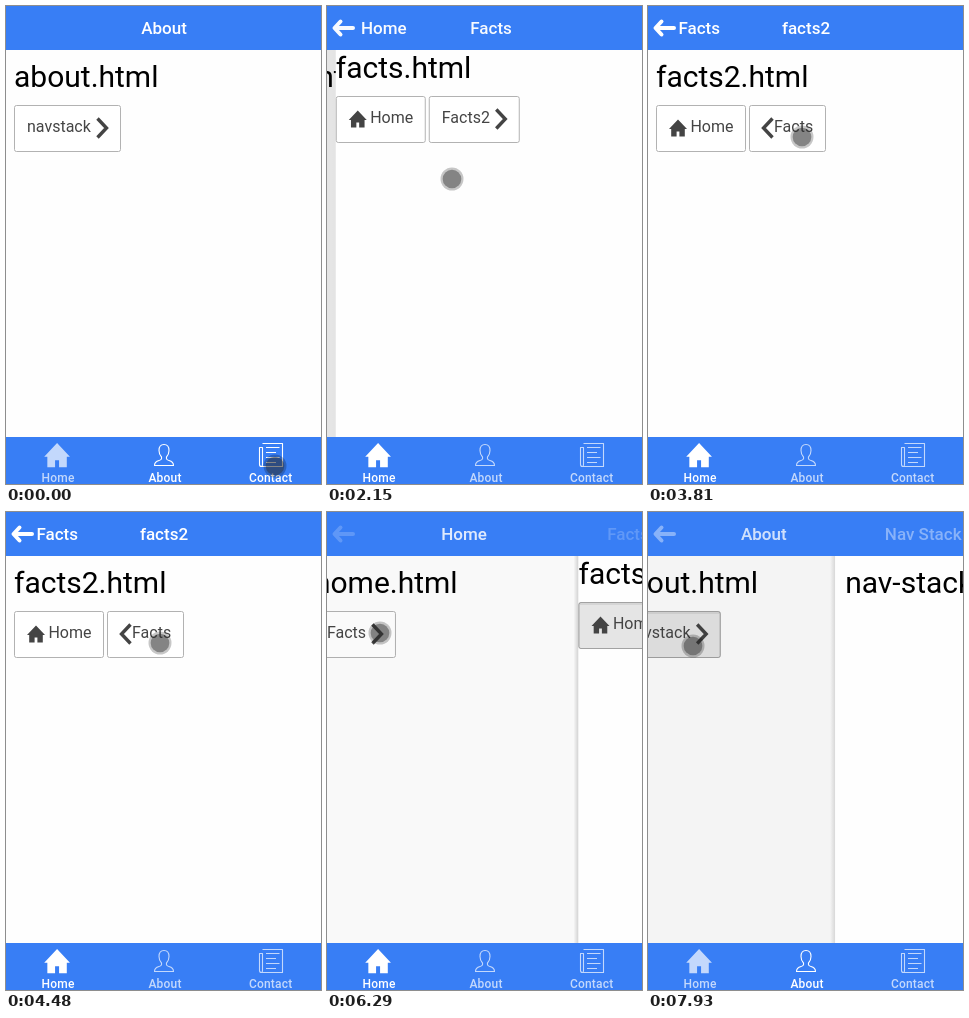
An HTML page for the animation above (8 s loop, 315 by 478 pixels).

```html
<!DOCTYPE html>
<html lang="en">
<head>
<meta charset="utf-8">
<title>Tabs and navigation</title>
<style>
html, body { margin: 0; width: 100%; height: 100%; overflow: hidden; background: #fff; }
svg { display: block; width: 315px; height: 478px; }
text { font-family: Roboto, Arial, sans-serif; white-space: pre; }
.bar { font-size: 17px; font-weight: 500; fill: #fff; }
.tab { font-size: 12px; font-weight: 500; letter-spacing: .2px; fill: #fff; text-anchor: middle; }
.h1 { font-size: 30px; fill: #000; }
.label { font-size: 16px; fill: #444; }
.line { fill: none; stroke: #fff; stroke-width: 1.1; stroke-linejoin: round; }
</style>
</head>
<body>
<svg id="stage" viewBox="0 0 315 478">
  <defs>
    <linearGradient id="edge">
      <stop offset="0" stop-color="#000" stop-opacity="0"/>
      <stop offset="1" stop-color="#000" stop-opacity=".2"/>
    </linearGradient>
    <path id="house" d="M0 9.6 9 0l9 9.6h-2.2V17h-5.400v-5H7.600v5H2.200V9.600z"/>
  </defs>
  <rect width="315" height="478" fill="#fff"/>
  <g id="pages"></g>
  <rect width="315" height="44" fill="#387ef5"/>
  <g id="heads"></g>
  <path id="arrow" d="M13.500 15.500 7.500 22l6 6.500M8.500 22H26" fill="none" stroke="#fff"
    stroke-width="4" stroke-linecap="round" stroke-linejoin="round"/>
  <rect y="431" width="315" height="47" fill="#387ef5"/>
  <g id="tabs">
    <g>
      <use href="#house" transform="translate(38.200 437) scale(1.430)" fill="#fff"/>
      <text class="tab" x="52" y="476">Home</text>
    </g>
    <g>
      <path class="line" d="M158 438.500c-3.500 0-5 2.500-5 6 0 3 1 5 2.500 6.500.5 2-.5 3-2.500 3.500-3 .8-4.500 2-4.500 5h19c0-3-1.500-4.200-4.500-5-2-.5-3-1.500-2.500-3.500 1.500-1.500 2.500-3.500 2.500-6.500 0-3.500-1.500-6-5-6z"/>
      <text class="tab" x="159" y="476">About</text>
    </g>
    <g>
      <path class="line" d="M256.500 437.500h20v23h-21q-2 0-2-2v-17h3v17q0 2-1 2M260 441.500h13.500M260 446.500h10M260 451.500h13.500M260 456.500h10"/>
      <text class="tab" x="264.700" y="476">Contact</text>
    </g>
  </g>
  <g id="cursor">
    <circle r="11.500" fill="#000" fill-opacity=".22"/>
    <circle r="9.300" fill="#333" fill-opacity=".45"/>
  </g>
</svg>
<script>
const LOOP = 8000, SLIDE = 500, PRESS = 130, TAB_LEAD = 160;
const WIDTH = 317, INSET = -2, PARALLAX = 105, CENTER = 158, BACK_X = 30.4;

const $ = id => document.getElementById(id);
const set = (el, attrs) => { for (const k in attrs) el.setAttribute(k, attrs[k]); };
const clamp = x => Math.min(1, Math.max(0, x));
const pen = document.createElement('canvas').getContext('2d');
const measure = (text, font) => {
  pen.font = font + ' Roboto, Arial, sans-serif';
  return pen.measureText(text).width;
};
const titleLeft = text => CENTER - measure(text, '500 17px') / 2;

// Each button is [label, icon]; a tight page has no padding.
const screens = {
  home: { tab: 0, title: 'Home', h1: 'home.html', buttons: [['Facts', 'next']] },
  about: { tab: 1, title: 'About', h1: 'about.html', buttons: [['navstack', 'next']] },
  contact: { tab: 2, title: 'Contact', h1: 'contact.html', buttons: [] },
  facts: { tab: 0, title: 'Facts', back: 'Home', h1: 'facts.html', tight: true,
    buttons: [['Home', 'house'], ['Facts2', 'next']] },
  facts2: { tab: 0, title: 'facts2', back: 'Facts', h1: 'facts2.html',
    buttons: [['Home', 'house'], ['Facts', 'prev']] },
  stack: { tab: 1, title: 'Nav Stack', back: 'About', h1: 'nav-stack.html', buttons: [] }
};

// dir: 1 slides forward, -1 slides back, 0 cuts; button is the one tapped to leave.
const visits = [
  { at: 0, name: 'about', dir: 0 },
  { at: 120, name: 'contact', dir: 0 },
  { at: 900, name: 'home', dir: 0 },
  { at: 1825, name: 'facts', dir: 1, button: 0 },
  { at: 2860, name: 'facts2', dir: 1, button: 1 },
  { at: 4560, name: 'facts', dir: -1, button: 1 },
  { at: 6137, name: 'home', dir: -1, button: 0 },
  { at: 7140, name: 'about', dir: 0 },
  { at: 7848, name: 'stack', dir: 1, button: 0 }
];

// Pointer moves: [leave, arrive, x, y]
const START = [269, 460];
const hops = [
  [380, 740, 55, 459], [1250, 1600, 52, 130], [1900, 2120, 125, 173], [2120, 2510, 158, 130],
  [3700, 3810, 154, 131], [4700, 5500, 53, 121], [6300, 6700, 158, 453], [7300, 7660, 45, 134]
];

// The screen refreshes in evenly spaced bursts: [first, last, count]
const bursts = [
  [0, 120, 2], [430, 1370, 7], [1490, 2510, 9], [2630, 3350, 6], [3810, 3930, 2],
  [4240, 5170, 8], [5320, 5620, 3], [6020, 6710, 6], [6990, 7140, 2], [7420, 7930, 5]
];

function lastRefresh(t) {
  const [first, last, count] = bursts.filter(b => b[0] <= t).pop();
  const gap = (last - first) / (count - 1);
  const step = Math.min(count - 1, Math.floor((t - first + 9) / gap));
  return Math.floor((first + step * gap) / 10) * 10;
}

function chevron(x, y, dir) {
  const tip = x + 6 + 4.5 * dir, tail = x + 6 - 4.5 * dir;
  return `<path d="M${tail} ${y + 13.5}L${tip} ${y + 23}L${tail} ${y + 32.5}"
    fill="none" stroke="#444" stroke-width="3.4"/>`;
}

function button(x, y, label, icon) {
  const tw = Math.round(measure(label, '16px'));
  const lead = { house: 21.4, prev: 12, next: 0 }[icon];
  const w = Math.round(26 + tw + lead + (icon === 'next' ? 17 : 0));
  const box = `x="${x + .5}" y="${y + .5}" width="${w - 1}" height="46" rx="2"`;
  const art = {
    house: `<use href="#house" x="${x + 13}" y="${y + 14.5}" fill="#444"/>`,
    prev: chevron(x + 13, y, -1),
    next: chevron(x + 18 + tw, y, 1)
  }[icon];
  const svg = `<rect ${box} fill="#fff" stroke="#b2b2b2"/>
    <g class="press"><rect ${box} fill="#e5e5e5" stroke="#a2a2a2"/>
    <path d="M${x + 1} ${y + 2}h${w - 2}" stroke="#000" stroke-opacity=".07" stroke-width="2"/></g>
    ${art}<text class="label" x="${x + 13 + lead}" y="${y + 27}">${label}</text>`;
  return { svg, w };
}

function pageArt(name, s) {
  const x = s.tight ? 0 : 10, top = s.tight ? 90 : 99;
  let left = x, art = '';
  for (const [label, icon] of s.buttons) {
    const b = button(left, top, label, icon);
    art += b.svg;
    left += b.w + 3;
  }
  return `<g id="page-${name}"><rect class="edge" x="-5" y="44" width="5" height="387" fill="url(#edge)"/>
    <rect y="44" width="${WIDTH}" height="387" fill="#fefefe"/>
    <text class="h1" x="${x}" y="${top - 18}">${s.h1}</text>${art}
    <rect class="dim" y="44" width="${WIDTH}" height="387"/></g>`;
}

const headArt = (name, s) => `<g id="head-${name}"><text class="bar title" y="28">${s.title}</text>
  <text class="bar back" y="28">${s.back || ''}</text></g>`;

const entries = Object.entries(screens);
$('pages').innerHTML = entries.map(([n, s]) => pageArt(n, s)).join('');
$('heads').innerHTML = entries.map(([n, s]) => headArt(n, s)).join('');

for (const [n, s] of entries) {
  const page = $('page-' + n), head = $('head-' + n);
  Object.assign(s, {
    page, head,
    edge: page.querySelector('.edge'), dim: page.querySelector('.dim'),
    presses: page.querySelectorAll('.press'),
    titleEl: head.querySelector('.title'), backEl: head.querySelector('.back'),
    left: titleLeft(s.title), backLeft: titleLeft(s.back || '')
  });
}

// Cubic bezier (.36, .66, .04, 1), solved by bisection.
function ease(x) {
  if (x <= 0 || x >= 1) return clamp(x);
  const curve = (s, a, b) => 3 * s * (1 - s) ** 2 * a + 3 * s * s * (1 - s) * b + s ** 3;
  let lo = 0, hi = 1;
  for (let i = 0; i < 24; i++) {
    const mid = (lo + hi) / 2;
    if (curve(mid, .36, .04) < x) lo = mid; else hi = mid;
  }
  return curve(lo, .66, 1);
}

// phase: -1 waits at the right, 0 is in place, 1 is covered.
function place(s, phase) {
  const ahead = Math.max(0, -phase), behind = Math.max(0, phase);
  const opacity = 1 - ahead - behind;
  s.page.style.display = s.head.style.display = '';
  set(s.page, { transform: `translate(${INSET + ahead * WIDTH - behind * PARALLAX} 0)` });
  set(s.edge, { opacity: ahead });
  set(s.dim, { opacity: .1 * behind });
  set(s.titleEl, { x: s.left + ahead * (2 * CENTER - s.left) - behind * (s.left - BACK_X), opacity });
  set(s.backEl, { x: BACK_X + ahead * (s.backLeft - BACK_X) - behind * 100, opacity });
}

function cursorAt(t) {
  let [x, y] = START;
  for (const [leave, arrive, toX, toY] of hops) {
    const k = clamp((t - leave) / (arrive - leave));
    x += (toX - x) * k;
    y += (toY - y) * k;
  }
  return `translate(${x} ${y})`;
}

function draw(t) {
  for (const [, s] of entries) {
    s.page.style.display = s.head.style.display = 'none';
    s.presses.forEach(p => set(p, { opacity: 0 }));
  }
  const index = visits.filter(v => v.at <= t).length - 1;
  const visit = visits[index], now = screens[visit.name];
  const p = visit.dir ? ease((t - visit.at) / SLIDE) : 1;
  let arrow = now.back ? 1 : 0;
  if (p < 1) {
    const old = screens[visits[index - 1].name];
    const [under, over, cover] = visit.dir > 0 ? [old, now, p] : [now, old, 1 - p];
    place(under, cover);
    place(over, cover - 1);
    $('pages').append(under.page, over.page);
    arrow = under.back ? 1 : cover;
  } else {
    place(now, 0);
  }
  set($('arrow'), { opacity: arrow });

  visits.forEach((v, i) => {
    if (v.dir && t >= v.at - PRESS && t < v.at + SLIDE)
      set(screens[visits[i - 1].name].presses[v.button], { opacity: 1 });
  });

  const next = visits[index + 1];
  const touched = next && !next.dir && t >= next.at - TAB_LEAD ? screens[next.name].tab : now.tab;
  [...$('tabs').children].forEach((tab, i) =>
    set(tab, { opacity: i === now.tab || i === touched ? 1 : .7 }));
  set($('cursor'), { transform: cursorAt(t) });
}

function frame() {
  draw(lastRefresh(performance.now() % LOOP));
  requestAnimationFrame(frame);
}
frame();
</script>
</body>
</html>
```
